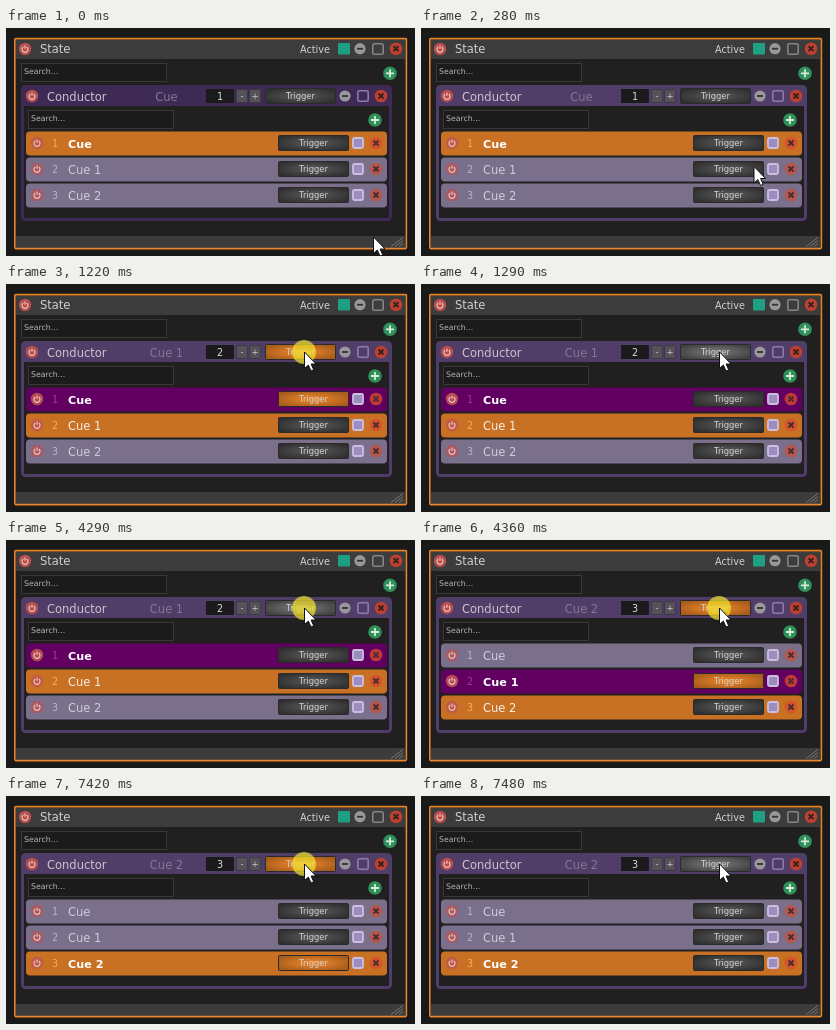
These frames come from a looping animation (409 px wide and 228 px high, 8000 ms). An HTML page:

```html
<!DOCTYPE html>
<html>
<head>
<meta charset="utf-8">
<style>
html, body { margin: 0; width: 100%; height: 100%; overflow: hidden; background: #191919; }
svg { display: block; width: 100vw; height: 100vh; font-family: "DejaVu Sans", Verdana, sans-serif; }
</style>
</head>
<body>
<svg id="stage" viewBox="0 0 409 228">
  <defs>
    <radialGradient id="plain" r=".58"><stop stop-color="#5c5c5c"/><stop offset="1" stop-color="#303030"/></radialGradient>
    <radialGradient id="hover" r=".58"><stop stop-color="#7c7c7c"/><stop offset="1" stop-color="#424242"/></radialGradient>
    <radialGradient id="lit" r=".58"><stop stop-color="#f08a2c"/><stop offset="1" stop-color="#a85c1c"/></radialGradient>
  </defs>
</svg>
<script>
const LOOP = 8000;
const stage = document.getElementById('stage');

function el(tag, attrs, parent = stage) {
  const node = document.createElementNS('http://www.w3.org/2000/svg', tag);
  set(node, attrs);
  parent.appendChild(node);
  return node;
}
function set(node, attrs) {
  for (const key in attrs) node.setAttribute(key, attrs[key]);
}
const rect = (x, y, width, height, fill, more = {}) => el('rect', { x, y, width, height, fill, ...more });
const path = (d, stroke, width = 1, more = {}) =>
  el('path', { d, stroke, 'stroke-width': width, fill: 'none', ...more });
const disc = (cx, cy, r, fill, more = {}) => el('circle', { cx, cy, r, fill, ...more });
function text(x, y, size, fill, content, more = {}) {
  const node = el('text', { x, y, 'font-size': size, fill, ...more });
  node.textContent = content;
  return node;
}
const middle = { 'text-anchor': 'middle' };

function power(x, y) {
  const body = disc(x, y, 6.2, '#b84f4c');
  path(`M${x - 1.8} ${y - 2}a3 3 0 1 0 3.6 0M${x} ${y - 3.6}v3.4`, '#e6c4c0', 1.2);
  return body;
}
function cross(x, y, mark = '#33201e') {
  const body = disc(x, y, 6.3, '#bd4030');
  path(`M${x - 2.5} ${y - 2.5}l5 5m0 -5l-5 5`, mark, 1.8);
  return body;
}
function plus(x, y) {
  disc(x, y, 6.8, '#2f9159');
  path(`M${x - 4} ${y}h8M${x} ${y - 4}v8`, '#d5ebdc', 1.8);
}
function minus(x, y) {
  disc(x, y, 5.6, '#9a979c');
  path(`M${x - 3} ${y}h6`, '#333', 1.8);
}
function search(x, y) {
  rect(x + .5, y + .5, 145, 18, '#1b1b1b', { stroke: '#383838' });
  text(x + 3, y + 11, 7.8, '#b4b4b4', 'Search...');
}
function trigger(x, y) {
  const button = rect(x + .5, y + .5, 70, 15, 'url(#plain)', { rx: 1, stroke: '#2a2a2a' });
  text(x + 35.5, y + 11.2, 8.4, '#d0d0d0', 'Trigger', middle);
  return button;
}

// Backdrop with its faint grid
path('M0 149.5H409M283.5 0V228', '#151515');

// Outer panel
rect(9, 10.5, 391, 210, '#202020', { rx: 1 });
rect(10, 12, 389, 19, '#3c3c3c');
rect(10, 208, 389, 12, '#3c3c3c');
path('M385 218.5l12 -9M389 218.5l8 -6M393 218.5l4 -3', '#777');
rect(8.8, 10.6, 391.6, 210, 'none', { rx: 1, stroke: '#e8842a', 'stroke-width': 1.6 });
power(19, 21);
text(34, 25, 11.5, '#d0d0d0', 'State');
text(294, 24.5, 9.7, '#d0d0d0', 'Active');
rect(332, 15, 12, 11.5, '#1fa083', { rx: 1 });
minus(354, 20.7);
rect(366.8, 15.8, 10.4, 10.4, 'none', { rx: 1.5, stroke: '#858585', 'stroke-width': 1.6 });
cross(390, 20.7);
search(15, 35);
plus(384, 45.3);

// Conductor panel
const frame = rect(16.5, 58.5, 368, 133, '#202020', { rx: 3, 'stroke-width': 3 });
const bar = rect(16, 58, 369, 20, '#3f2a56', { rx: 2 });
power(26, 68);
text(41, 72.5, 11.5, '#cac6ce', 'Conductor');
const cueName = text(160.5, 72.5, 11.5, '#85788f', '', middle);
rect(200, 61, 28, 14, '#1b1b1b', { rx: 1 });
const cueNumber = text(214, 71.5, 9.6, '#d8d8d8', '', middle);
for (const [x, sign] of [[230, '-'], [243, '+']]) {
  rect(x + .5, 61.5, 11, 13, '#555159', { rx: 1, stroke: '#3d3944' });
  text(x + 6, 71.3, 8.5, '#c8c8c8', sign, middle);
}
const mainTrigger = trigger(259, 60);
minus(339, 68);
rect(351.8, 62.8, 10.4, 10.4, 'none', { rx: 1.5, stroke: '#8d79b4', 'stroke-width': 1.6 });
cross(375, 68);
search(22, 82);
plus(369, 92);

const rows = ['Cue', 'Cue 1', 'Cue 2'].map((name, i) => {
  const y = 115 + 26 * i;
  const back = rect(20, y - 11.5, 361, 24, '#7a708c', { rx: 4 });
  const knob = power(31, y);
  const number = text(49, y + 4, 9.6, '#bbb3c8', i + 1, middle);
  const label = text(62, y + 4.6, 11.5, '#d0ccd6', name);
  const button = trigger(272, y - 8);
  rect(347, y - 5, 10, 10, '#9c8cc0', { rx: 1.5, stroke: '#cbc0e2', 'stroke-width': 1.8 });
  const close = cross(370, y, '#4c2a30');
  return { name, back, knob, number, label, button, close };
});

const looks = {
  idle: { back: '#7a708c', number: '#bbb3c8', label: '#d0ccd6', knob: '#a95961', close: '#b4584e' },
  next: { back: '#c87124', number: '#f3b04c', label: '#f7efe6', knob: '#c25a45', close: '#d3562a' },
  current: { back: '#620062', number: '#a0389a', label: '#ffffff', knob: '#b84a55', close: '#c03a38' }
};

// Pointer and click halo
const halo = disc(298, 68, 12, '#f0e02c', { opacity: .72 });
const pointer = el('path', {
  d: 'M0 0V16.5L3.8 13L6.5 19L9.2 17.8L6.6 12H11.6Z',
  fill: '#fff', stroke: '#111', 'stroke-width': 1
});

// Each click: halo on, cue fired, button released
const clicks = [
  { press: 1150, fire: 1220, release: 1290, current: 0, next: 1 },
  { press: 4290, fire: 4350, release: 4420, current: 1, next: 2 },
  { press: 7420, fire: 7420, release: 7480, current: 2, next: 2 }
];

function pointerAt(t) {
  const step = Math.min(8, Math.floor(t / 68.7));
  const p = step / 8;
  const eased = p * p * (3 - 2 * p);
  return { x: 367.5 - 69 * eased, y: 209 - 141 * eased };
}

function render(t) {
  const { x, y } = pointerAt(t);
  set(pointer, { transform: `translate(${x} ${y})` });

  const inside = y < 193;
  const over = inside && y < 77 && x > 259 && x < 330;
  const tint = inside ? '#503d68' : '#3f2a56';
  set(frame, { stroke: tint });
  set(bar, { fill: tint });

  const pressed = clicks.some(c => t >= c.press && t < c.release);
  const flash = clicks.some(c => t >= c.fire && t < c.release);
  const { current, next } = clicks.filter(c => t >= c.fire).pop() || { current: 0, next: 0 };

  set(halo, { visibility: pressed ? 'visible' : 'hidden' });
  set(mainTrigger, { fill: `url(#${flash ? 'lit' : over ? 'hover' : 'plain'})` });
  cueName.textContent = rows[next].name;
  cueNumber.textContent = next + 1;

  rows.forEach((row, i) => {
    const look = looks[i === next ? 'next' : i === current ? 'current' : 'idle'];
    for (const part in look) set(row[part], { fill: look[part] });
    const bold = i === current;
    set(row.label, { 'font-weight': bold ? 700 : 400, 'font-size': bold ? 11.2 : 11.5 });
    if (bold) set(row.label, { fill: '#fff' });
    set(row.button, { fill: `url(#${flash && bold ? 'lit' : 'plain'})` });
  });
}

const start = performance.now();
function tick() {
  render((performance.now() - start) % LOOP);
  requestAnimationFrame(tick);
}
tick();
</script>
</body>
</html>
```
